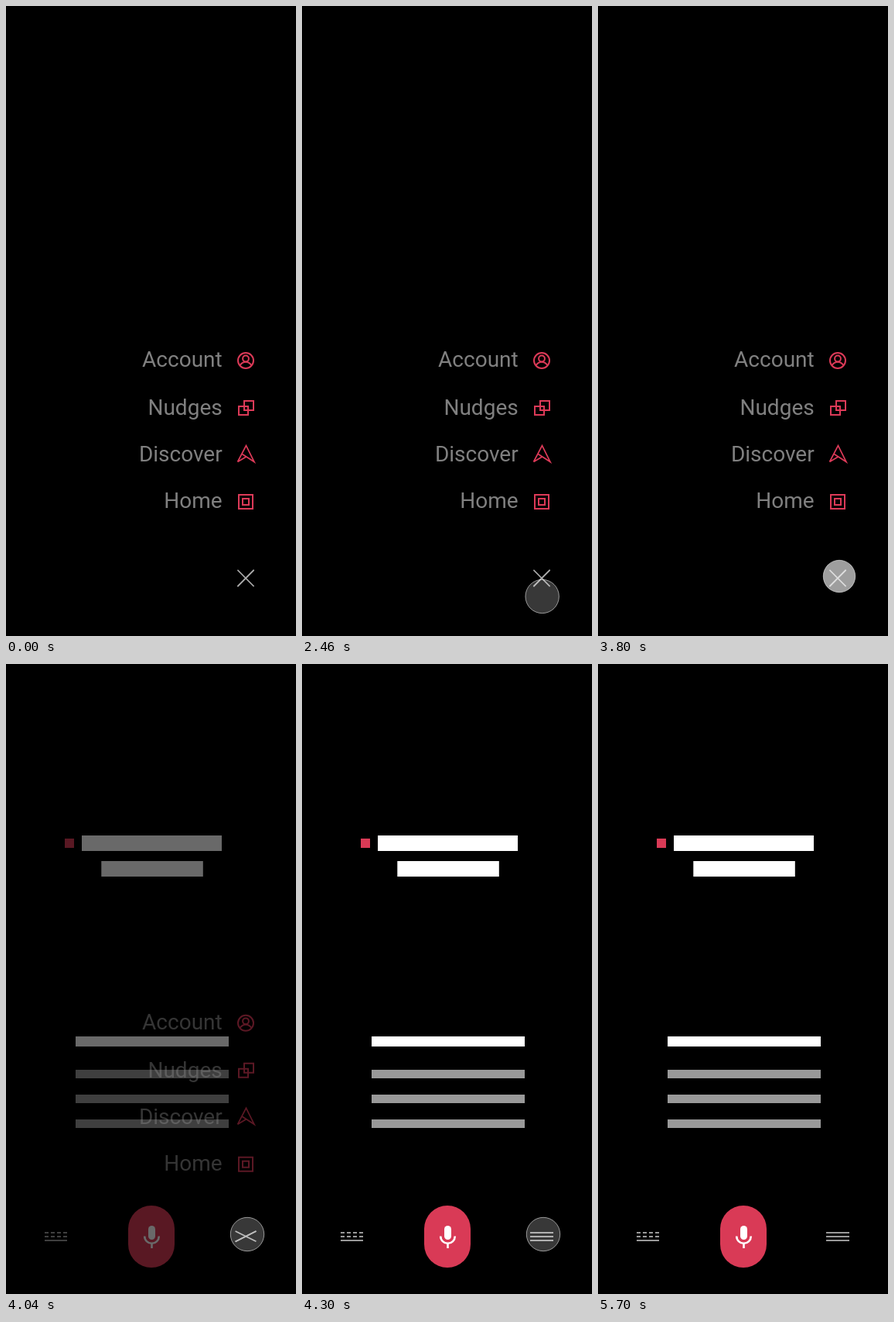
Write an HTML page that moves like this. It is 375x812 px and loops after 8120 ms.

```html
<!DOCTYPE html>
<html lang="en">
<head>
<meta charset="utf-8">
<title>Menu transition</title>
<style>
  html, body { margin: 0; width: 100%; height: 100%; overflow: hidden; background: #000; }
  svg { display: block; width: 375px; height: 812px; }
  text { font: 28px Roboto, sans-serif; fill: #808080; text-anchor: end; }
  .icon { fill: none; stroke: #dc3a58; stroke-width: 2; }
  .red { fill: #d93a56; }
  .white { fill: #fff; }
  .gray { fill: #999; }
  .line { fill: none; stroke: #999; stroke-width: 2; }
</style>
</head>
<body>
<svg viewBox="0 0 375 812">
  <g id="menu">
    <text x="279.7" y="465">Account</text>
    <text x="279.7" y="527">Nudges</text>
    <text x="279.7" y="587">Discover</text>
    <text x="279.7" y="647">Home</text>
    <g class="icon">
      <circle cx="310" cy="457" r="10"/>
      <circle cx="310" cy="454.5" r="3.9"/>
      <path d="M302.5 463.2Q305.5 458.8 310 458.8T317.5 463.2"/>
      <path d="M308 509h12v12h-12zM301 516h12v11h-12z"/>
      <path stroke-width="1.7" d="M299.5 587.5L310.5 566.5L321 587.5L305 577.2M299.5 587.5L311 580.7"/>
      <path d="M301 630h18v18h-18zM306 635h8v8h-8z"/>
    </g>
  </g>
  <g id="screen">
    <rect class="red" x="76" y="225" width="12" height="12"/>
    <rect class="white" x="98" y="221" width="181" height="20"/>
    <rect class="white" x="123.3" y="254" width="131.5" height="20"/>
    <rect class="white" x="90" y="480" width="198" height="13"/>
    <path class="gray" d="M90 523h198v11h-198zM90 555h198v11h-198zM90 587h198v11h-198z"/>
    <rect class="red" x="158" y="698" width="60" height="80" rx="30"/>
    <rect class="white" x="184" y="724" width="9" height="18" rx="4.5"/>
    <path d="M179.2 737.5a9.3 9.3 0 0 0 18.6 0M188.5 747V753" fill="none" stroke="#fff" stroke-width="2.6"/>
    <path class="line" stroke-dasharray="5 3" d="M50 733h29M50 738h29"/>
    <path class="line" d="M50 743h29"/>
  </g>
  <g id="toggle" fill="none" stroke="#999">
    <path d="M-15 0h30"/>
    <path d="M-15 0h30"/>
    <path d="M-15 0h30"/>
  </g>
  <circle id="cursor" fill="#fff" stroke="#fff" stroke-opacity=".55"/>
</svg>
<script>
const LOOP = 8120;
const $ = id => document.getElementById(id);
const menu = $('menu'), screenEl = $('screen'), toggle = $('toggle'), cursor = $('cursor');
const bars = [...toggle.children];

const span = (t, a, b) => Math.min(1, Math.max(0, (t - a) / (b - a)));
const mix = (a, b, p) => a + (b - a) * p;
const set = (el, attrs) => {
  for (const key in attrs) el.setAttribute(key, attrs[key]);
};

function cursorAt(t) {
  if (t < 2740) {
    const p = 1 - (1 - span(t, 1920, 2720)) ** 1.51;
    return [mix(309, 311, p), mix(808, 750.5, p)];
  }
  if (t < 5260) {
    const p = span(t, 2740, 3380);
    const e = p * (2 - p);
    return [mix(311, 312, e), mix(750.5, 735, e)];
  }
  const p = span(t, 5290, 5700) ** 1.6;
  return [mix(312, 310.5, p), mix(736, 811, p)];
}

function drawCursor(t) {
  const [x, y] = cursorAt(t);
  const pressed = t >= 3800 && t < 3880;
  set(cursor, {
    cx: x, cy: y,
    r: pressed ? 20.7 : 21.7,
    'fill-opacity': pressed ? 0.62 : 0.22,
    visibility: t >= 1920 && t < 5700 ? 'visible' : 'hidden'
  });
}

// Cross opens into three stacked lines.
function drawToggle(p) {
  const angle = 45 * (1 - p);
  const gap = 5 * p ** 5;
  const y = mix(737.5, 738, p);
  set(toggle, { 'stroke-width': mix(1.5, 2, p), stroke: p < 1 ? '#aaa' : '#999' });
  [-1, 0, 1].forEach((row, i) => set(bars[i], {
    transform: `translate(310 ${y + row * gap}) rotate(${row < 0 ? angle : -angle})`
  }));
}

function draw(t) {
  const out = span(t, 3860, 4170);
  const fade = span(t, 3860, 4300);
  set(menu, { opacity: 1 - out, transform: `translate(0 ${10 * out})` });
  set(screenEl, { opacity: fade });
  drawToggle(fade);
  drawCursor(t);
}

const start = performance.now();
function tick() {
  draw((performance.now() - start) % LOOP);
  requestAnimationFrame(tick);
}
draw(0);
requestAnimationFrame(tick);
</script>
</body>
</html>
```
